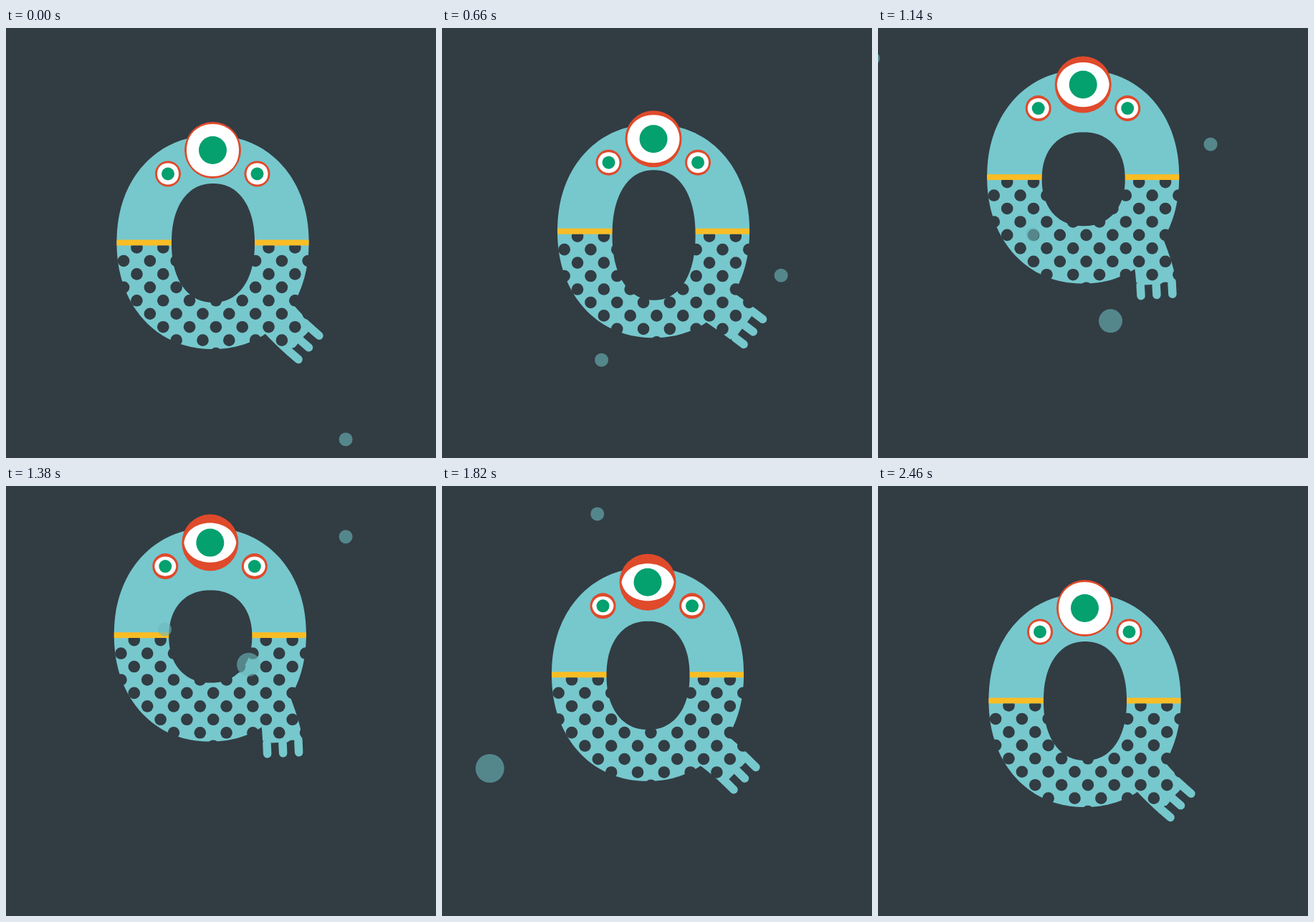
An HTML page with a canvas for the animation above (2560 ms loop, 600 by 600 pixels).

```html
<!DOCTYPE html>
<html>
<head>
<meta charset="utf-8">
<style>
  html, body { margin: 0; width: 100%; height: 100%; overflow: hidden; background: #323c43; }
  canvas { display: block; }
</style>
</head>
<body>
<canvas id="stage" width="600" height="600"></canvas>
<script>
const ctx = document.getElementById('stage').getContext('2d');
const BG = '#323c43', TEAL = '#76c8cd', YELLOW = '#f9bd25', RED = '#df4a2b', GREEN = '#04a06e';
const BUBBLE = 'rgba(107,185,188,.6)';
const TAU = Math.PI * 2, LOOP = 2560, STEP = 40, LAST = 60, APEX = 29, SWAY = 16.5;

const bubbles = [
  { x: 468, crest: 0, y: 574, rise: 15.25, r: 9.5 },
  { x: 216.5, crest: 15, y: 682.7, rise: 14.63, r: 9.5 },
  { x: -13, crest: 10.8, y: 454, rise: 15.25, r: 9.5 },
  { x: 334.5, crest: 19.6, y: 1127, rise: 26.6, r: 16.5 },
  { x: 54, crest: 44, y: 1813, rise: 32.25, r: 20, last: 55 }
];

const progress = (n, from, to) => Math.min(1, Math.max(0, (n - from) / (to - from)));
const smooth = u => u * u * (3 - 2 * u);
const pulse = (n, from, to) => Math.sqrt(Math.max(0, Math.sin(Math.PI * progress(n, from, to))));

function disc(x, y, r, color) {
  ctx.fillStyle = color;
  ctx.beginPath();
  ctx.arc(x, y, r, 0, TAU);
  ctx.fill();
}

// Slightly squared ellipse
function oval(cx, cy, rx, ry, power) {
  const bulge = v => Math.sign(v) * Math.abs(v) ** power;
  ctx.beginPath();
  for (let i = 0; i < 180; i++) {
    const a = TAU * i / 180;
    ctx.lineTo(cx + rx * bulge(Math.cos(a)), cy + ry * bulge(Math.sin(a)));
  }
  ctx.closePath();
}

function eye(x, y, r, white, iris, open) {
  disc(x, y, r, RED);
  const c = white * Math.sqrt(open), h = white * open * 4 / 3;
  ctx.fillStyle = '#fff';
  ctx.beginPath();
  ctx.moveTo(x - white, y);
  ctx.bezierCurveTo(x - c, y - h, x + c, y - h, x + white, y);
  ctx.bezierCurveTo(x + c, y + h, x - c, y + h, x - white, y);
  ctx.fill();
  disc(x, y, iris, GREEN);
}

// Runs draw in the hand's own axes: x along the fingers, y across them
function inHand(swing, bend, paint) {
  const rad = Math.PI / 180, a = swing * rad;
  ctx.save();
  ctx.translate(375 + 66 * Math.cos(a), 400 + 66 * Math.sin(a));
  ctx.rotate((swing + bend) * rad);
  paint(ctx.getTransform());
  ctx.restore();
}

const FINGER = 15, SPREAD = 22, THICK = 11.5;

function tail(swing, bend, base) {
  inHand(swing, bend, hand => {
    const local = (x, y) => {
      const p = hand.inverse().transformPoint(base.transformPoint(new DOMPoint(x, y)));
      return [p.x, p.y];
    };
    const edge = SPREAD + THICK / 2;
    ctx.fillStyle = TEAL;
    ctx.beginPath();
    ctx.moveTo(...local(340, 400));
    ctx.lineTo(...local(400, 385));
    ctx.quadraticCurveTo(-FINGER - 20, -edge, -FINGER, -edge);
    ctx.lineTo(-FINGER, edge);
    ctx.quadraticCurveTo(-FINGER - 20, edge, ...local(360, 425));
    ctx.fill();
  });
}

function fingers(swing, bend) {
  inHand(swing, bend, () => {
    ctx.strokeStyle = TEAL;
    ctx.lineWidth = THICK;
    ctx.lineCap = 'round';
    ctx.beginPath();
    for (const y of [-SPREAD, 0, SPREAD]) {
      ctx.moveTo(-FINGER, y);
      ctx.lineTo(0, y);
    }
    ctx.stroke();
  });
}

function ring() {
  ctx.save();
  oval(288.5, 299, 134, 149, 0.94);
  ctx.fillStyle = TEAL;
  ctx.fill();
  ctx.clip();
  ctx.fillStyle = YELLOW;
  ctx.fillRect(150, 295.5, 280, 8);
  ctx.restore();
}

function dots() {
  ctx.save();
  ctx.beginPath();
  ctx.rect(140, 303.5, 330, 200);
  ctx.clip();
  for (let row = 0; row < 10; row++) {
    for (let col = 0; col < 9; col++) {
      disc(145.7 + 36.8 * col + (row % 2) * 18.4, 306.5 + 18.45 * row, 8.3, BG);
    }
  }
  ctx.restore();
}

function draw(n) {
  // Slow drift up, a strong tail stroke, then sinking back
  const drift = smooth(progress(n, 0, APEX));
  const stroke = smooth(progress(n, 19, APEX));
  const sink = smooth((1 - progress(n, APEX, LAST)) ** 1.35);
  const windup = drift * (1 - stroke), lift = stroke * sink;
  const flick = pulse(n, 0, 18);

  const swing = 44 - 40 * windup ** 2 + 43 * lift ** 3 + 4 * Math.sin(TAU * n / LAST);
  const bend = -3 + 55 * windup ** 2 + 15 * lift - 17 * flick;
  const open = 1 - 0.12 * flick - 0.29 * pulse(n, 24, LAST);
  const smallOpen = 1 - (1 - open) * 0.4;

  ctx.fillStyle = BG;
  ctx.fillRect(0, 0, 600, 600);
  ctx.save();
  ctx.translate(12.5 * windup - 4 * lift, -(30 * drift + 69 * stroke) * sink);
  tail(swing, bend, ctx.getTransform());
  ring();
  oval(289, 300 + 9 * windup + 1.5 * lift, 58, 83 + 28 * windup ** 2 - 20 * lift, 0.9);
  ctx.fillStyle = BG;
  ctx.fill();
  dots();
  fingers(swing, bend);
  eye(226, 203.5, 18, 15, 9, smallOpen);
  eye(350.5, 203.5, 18, 15, 9, smallOpen);
  eye(288.5, 170.5, 39.5, 36.5, 19.5, open);
  ctx.restore();

  for (const { x, crest, y, rise, r, last = LAST } of bubbles) {
    if (n > last) continue;
    disc(x + r * 0.64 * Math.cos(TAU * (n - crest) / SWAY), y - rise * n, r, BUBBLE);
  }
}

function tick() {
  const t = performance.now() % LOOP;
  // The first and last poses hold for 100 ms
  draw(Math.min(LAST, Math.max(0, Math.floor((t - 60) / STEP))));
  requestAnimationFrame(tick);
}
tick();
</script>
</body>
</html>
```
